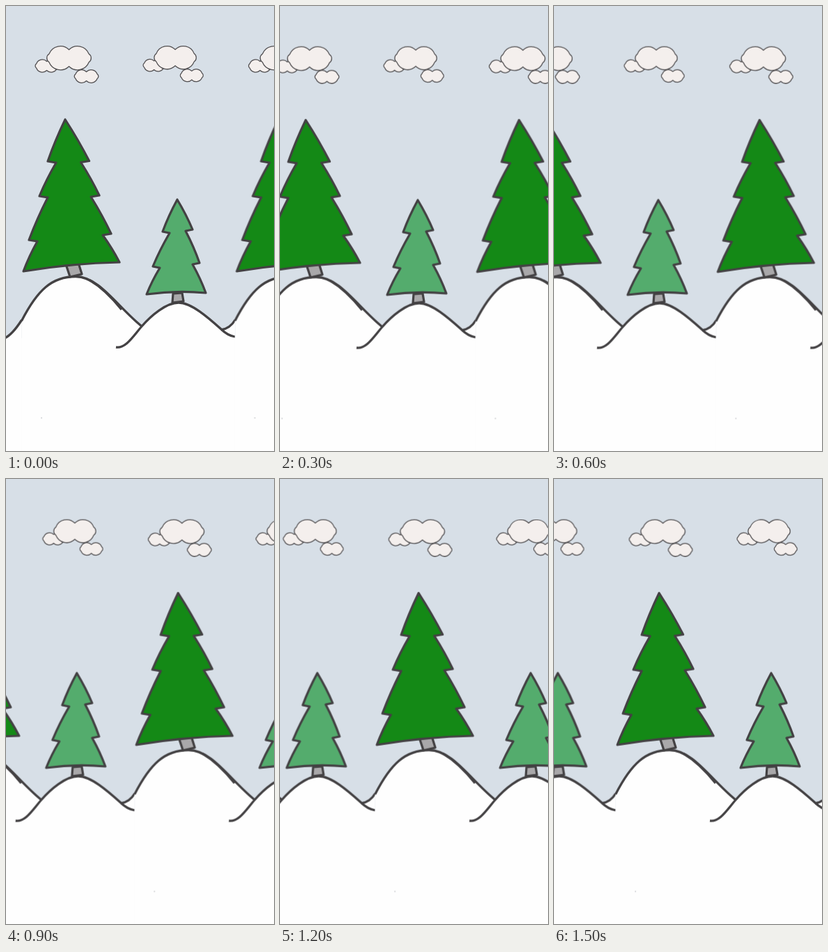
Recreate the animation shown at these times as an HTML page. Size 385 px wide and 639 px high, loop 1800 ms.

```html
<!DOCTYPE html>
<html lang="en">
<head>
<meta charset="utf-8">
<title>Winter trees</title>
<style>
  html, body { margin: 0; width: 100%; height: 100%; overflow: hidden; background: #d7dfe7; }
  svg { display: block; width: 385px; height: 639px; }
  path { stroke: #434143; stroke-width: 3.2; stroke-linejoin: round; }
  .line { fill: none; stroke-width: 3.3; }
  .snow { fill: #fefefe; stroke: none; }
  .pine { fill: #148916; }
  .fir { fill: #54ac6d; }
  .trunk { fill: #a9a8aa; }
  .cloud { fill: #f4efed; stroke: #504e50; stroke-width: 1.3; }
  .speck { fill: #c9cccf; }
</style>
</head>
<body>
<svg viewBox="0 0 385 639">
  <rect class="snow" y="477" width="385" height="162"/>
  <g id="scene"></g>
</svg>
<script>
const SVG = 'http://www.w3.org/2000/svg';
const TILE = 306.5;
const STEP = 300;
const COUNT = 6;
const SHIFT = -48.1;
const scene = document.getElementById('scene');

function add(parent, tag, attrs) {
  const node = document.createElementNS(SVG, tag);
  for (const key in attrs) node.setAttribute(key, attrs[key]);
  return parent.appendChild(node);
}

const path = (parent, cls, d) => add(parent, 'path', { class: cls, d });

// Six round lobes around an ellipse
function cloud(cx, cy, rx, ry) {
  const cusp = i => {
    const a = (i + 0.5) * Math.PI / 3;
    return [cx + rx * Math.cos(a), cy + ry * Math.sin(a)];
  };
  let d = 'M' + cusp(0);
  for (let i = 0; i < 6; i++) {
    const a = cusp(i), b = cusp(i + 1);
    const r = 0.6 * Math.hypot(b[0] - a[0], b[1] - a[1]);
    d += `A${r} ${r} 0 0 1 ${b}`;
  }
  return d + 'Z';
}

// One flank from the tip down: a bowed edge to each branch end, then a notch back in
function flank(tip, ends, side, inset) {
  const edge = [];
  let from = tip;
  for (const [x, y] of ends) {
    edge.push({ from, bend: [(from[0] + x) / 2 + side * 2, (from[1] + y) / 2], to: [x, y] });
    from = [x - side * inset, y + 2];
  }
  return edge;
}

function tree(tip, right, left, inset) {
  const down = flank(tip, right, 1, inset);
  const up = flank(tip, left, -1, inset).reverse();
  const [a, b] = [down.at(-1).to, up[0].to];
  return 'M' + tip + down.map(e => `L${e.from}Q${e.bend} ${e.to}`).join('') +
    `Q${(a[0] + b[0]) / 2},${(a[1] + b[1]) / 2 - 5} ${b}` +
    up.map(e => `L${e.to}Q${e.bend} ${e.from}`).join('') + 'Z';
}

const pine = tree([85, 163],
  [[119.5, 222.5], [134, 272], [151, 327], [163, 368]],
  [[60, 223], [48, 273], [33, 336], [25, 381]], 12);
const fir = tree([246, 278],
  [[268, 321], [278, 369], [287, 412]],
  [[225, 324], [211, 374], [202, 414]], 10);

const foot = 'M-2 477Q9 472 22.5 451';
const bigHill = 'M22.5 452C45 408 66 388.5 100 388.5S160 432 195 460';
const ridge = 'M120 393.5Q143 407 166 436';
const smallHill = 'M158 490C172 492 182 475 195 460S230 426 248 426S290 447 309 464Q318 473 329 475';
const rise = 'M309 465Q322 463 329 451';

function drawTile(first) {
  const tile = add(scene, 'g', { transform: `translate(${first ? 0 : TILE} 0)` });

  for (const transform of ['', 'translate(157.1 1.7) scale(.95 .97)']) {
    const group = add(tile, 'g', { transform });
    path(group, 'cloud', cloud(58.5, 86, 17, 6.5));
    path(group, 'cloud', cloud(90.5, 74.7, 33, 12));
    path(group, 'cloud', cloud(115.5, 101, 18, 6.5));
  }

  // The rightmost tile edge overlaps the next hill, so only the first tile needs a foot
  const hills = [bigHill, smallHill, rise];
  if (first) hills.unshift(foot);
  hills.forEach(d => path(tile, 'snow', d + 'V640H' + parseFloat(d.slice(1)) + 'Z'));
  [...hills, ridge].forEach(d => path(tile, 'line', d));

  path(tile, 'trunk', 'M86 371L104 369L109 385L92 389Z');
  path(tile, 'pine', pine);
  path(tile, 'trunk', 'M240 413L253 412L255 424L239 426Z');
  path(tile, 'fir', fir);
  add(tile, 'circle', { class: 'speck', cx: 51, cy: 591.5, r: 0.9 });
}

drawTile(true);
drawTile(false);

// The view holds each position, then jumps
const frames = Array.from({ length: COUNT + 1 }, (_, i) => {
  const pose = i % COUNT;
  return {
    offset: i / COUNT,
    transform: `translate(${pose * SHIFT}px, ${pose ? 0.7 : 0}px)`,
    easing: 'step-end'
  };
});
scene.animate(frames, { duration: STEP * COUNT, iterations: Infinity });
</script>
</body>
</html>
```
